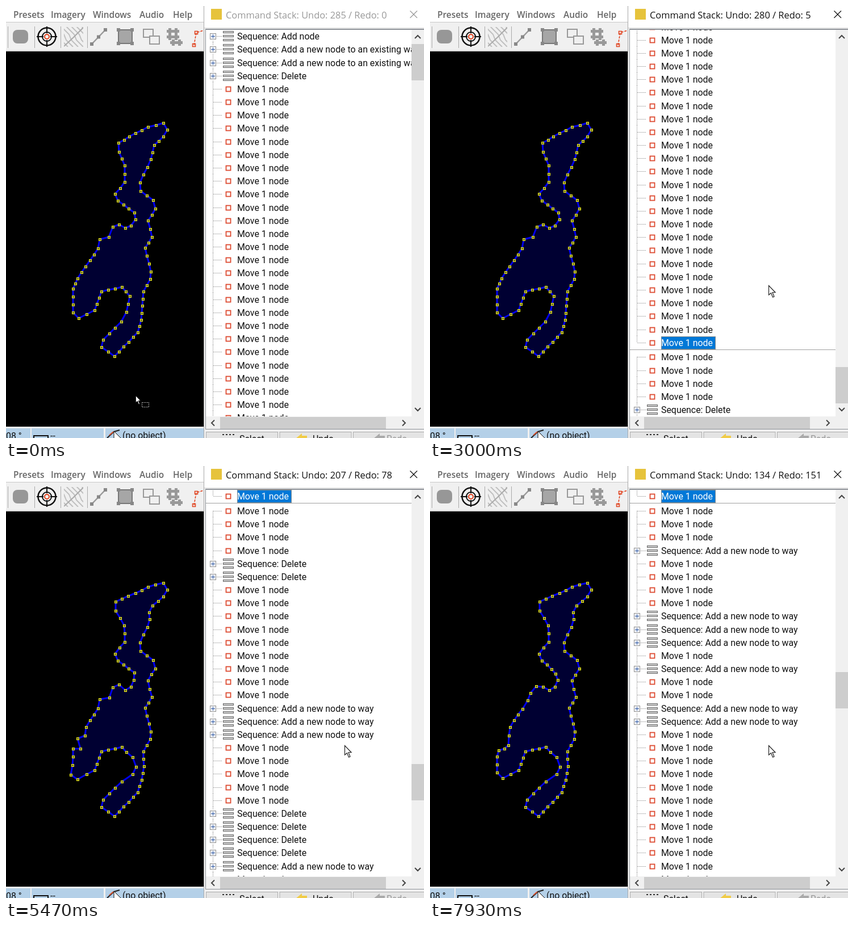
An HTML page with a canvas that plays this animation: 736x761 px, repeating every 8 s.

```html
<!DOCTYPE html>
<html lang="en">
<head>
<meta charset="utf-8">
<title>Undo stack</title>
<style>
html, body { margin: 0; width: 100%; height: 100%; overflow: hidden; background: #000; }
canvas { display: block; }
</style>
</head>
<body>
<canvas id="stage" width="736" height="761"></canvas>
<script>
const c = document.getElementById('stage').getContext('2d');
const LOOP = 8000, STEP = 200 / 3, ROW = 23.17, COUNT = 285;
const FIRST_UNDO = 2390, REPEAT = 2860, RATE = 0.02964;
const LIST_FONT = '15.9px Roboto, sans-serif';
const TITLE_FONT = '16.4px "Open Sans", sans-serif';
const MENU_FONT = '600 15.4px "Open Sans", sans-serif';

// Corners of the lake; the nodes between them are spaced evenly.
const corners = [
  [250,213], [277,206], [284,218], [277,230], [261,245], [255,270], [236,311], [237,326],
  [259,342], [263,357], [250,378], [257,407], [245,426], [255,468], [254,481], [242,503],
  [238,553], [232,575], [191,617], [168,601], [171,588], [203,556], [212,539], [218,511],
  [204,495], [168,503], [156,536], [128,550], [118,540], [118,498], [126,480], [162,427],
  [165,411], [181,407], [188,389], [199,385], [210,391], [220,387], [228,376], [226,364],
  [197,343], [192,331], [209,310], [209,281], [199,257], [198,241], [217,230]
];

// Each edit drags the nodes around a point while the undo steps run from one number to another.
const edits = [
  { at: [258, 256], reach: 15, move: [-6, 1], steps: [0, 28] },
  { at: [217, 530], reach: 18, move: [15, 6], steps: [29, 61] },
  { at: [118, 545], reach: 14, move: [-4, 4], steps: [29, 61] },
  { at: [200, 250], reach: 24, move: [-6, -2], steps: [29, 61] },
  { at: [165, 411], reach: 12, move: [8, 4], steps: [62, 99] },
  { at: [205, 388], reach: 14, move: [0, 5], steps: [62, 99] },
  { at: [226, 366], reach: 14, move: [-5, 2], steps: [62, 99] },
  { at: [124, 480], reach: 16, move: [12, 12], steps: [62, 99] },
  { at: [118, 545], reach: 14, move: [4, -4], steps: [132, 150] },
  { at: [180, 404], reach: 14, move: [-6, -8], steps: [132, 150] }
];

const wayRows = new Set([137, 142, 143, 144, 146, 149, 150, 180, 188, 222, 223, 224, 234, 242, 243, 244, 245]);
const deleteRows = new Set([3, 211, 212, 230, 231, 232, 233, 240, 241, 284]);

const clamp = (v, a = 0, b = 1) => Math.min(b, Math.max(a, v));
const mix = (a, b, p) => a + (b - a) * p;
const ease = p => p * p * (3 - 2 * p);
const noise = i => { const v = Math.sin(i * 12.9898 + 1) * 43758.5453; return v - Math.floor(v); };

function box(x, y, w, h, fill) {
  c.fillStyle = fill;
  c.fillRect(x, y, w, h);
}

function frame(x, y, w, h, color, width = 1) {
  c.strokeStyle = color;
  c.lineWidth = width;
  c.strokeRect(x, y, w, h);
}

function path(pts, stroke, width = 1, fill, closed) {
  c.beginPath();
  pts.forEach(p => c.lineTo(...p));
  if (closed) c.closePath();
  if (fill) { c.fillStyle = fill; c.fill(); }
  if (stroke) { c.strokeStyle = stroke; c.lineWidth = width; c.stroke(); }
}

function dashed(dash, drawIt) {
  c.setLineDash(dash);
  drawIt();
  c.setLineDash([]);
}

function ring(x, y, r, color, width) {
  c.beginPath();
  c.arc(x, y, r, 0, 7);
  c.strokeStyle = color;
  c.lineWidth = width;
  c.stroke();
}

function text(s, x, y, font, color) {
  c.font = font;
  c.fillStyle = color;
  c.fillText(s, x, y);
}

const label = (s, x, y, color = '#111') => text(s, x, y, LIST_FONT, color);

const nodes = corners.flatMap(([x, y], i) => {
  const [u, v] = corners[(i + 1) % corners.length];
  const n = Math.max(1, Math.round(Math.hypot(u - x, v - y) / 13));
  return Array.from({ length: n }, (_, k) => [mix(x, u, k / n), mix(y, v, k / n)]);
});

// A node jumps at its own random moment within an edit.
function place([x, y], i, done) {
  let dx = 0, dy = 0;
  for (const { at, reach, move, steps } of edits) {
    if (done < mix(steps[0] + 1, steps[1], noise(i))) continue;
    const pull = Math.exp(-((x - at[0]) ** 2 + (y - at[1]) ** 2) / reach ** 2);
    dx += move[0] * pull;
    dy += move[1] * pull;
  }
  return [Math.round(x + dx), Math.round(y + dy)];
}

function drawMap(done) {
  box(0, 80, 348, 661, '#000');
  const pts = nodes.map((p, i) => place(p, i, done));
  c.lineJoin = 'round';
  path(pts, '#0000ee', 3, '#000032', true);
  c.lineJoin = 'miter';
  for (const [x, y] of pts) {
    box(x - 2, y - 2, 5, 5, '#f0f010');
    box(x - 1, y - 1, 3, 3, '#6c6c30');
  }
}

function drawToolbar() {
  box(0, 0, 348, 29, '#fff');
  box(0, 29, 348, 51, '#f0f0f0');
  box(0, 28, 348, 1, '#c8c8c8');
  box(0, 78, 348, 2, '#d8d8d8');
  Object.entries({ Presets: 13, Imagery: 79, Windows: 153, Audio: 235, Help: 294 })
    .forEach(([s, x]) => text(s, x, 21, MENU_FONT, '#666'));
  for (let x = 3; x < 150; x += 46.5) box(Math.round(x), 36, 1, 38, '#aaa');

  c.beginPath();
  c.roundRect(12, 42, 27, 24, 8);
  c.fillStyle = '#979797';
  c.fill();

  ring(72, 54, 15.5, '#111', 2.5);
  ring(72, 54, 8, '#111', 2);
  ring(72, 54, 4, '#e0401c', 2);
  for (const s of [-1, 1]) {
    path([[72 + s * 6, 54], [72 + s * 18, 54]], '#111', 2);
    path([[72, 54 + s * 6], [72, 54 + s * 18]], '#111', 2);
  }

  c.save();
  c.beginPath();
  c.rect(102, 37, 34, 35);
  c.clip();
  for (let x = 70; x < 140; x += 9) path([[x, 36], [x + 14, 50], [x + 18, 60], [x + 30, 72]], '#c0c0c0', 2);
  path([[102, 71], [118, 56], [136, 38]], '#aaa', 2);
  c.restore();

  path([[151, 67], [175, 42]], '#999', 2.5);
  for (let k = 0; k < 3; k++) box(148 + 12 * k, 64 - 12.5 * k, 6, 6, '#888');

  box(198, 42, 24, 24, '#a6a6a6');
  frame(198, 42, 24, 24, '#777', 2);
  for (const x of [198, 222]) for (const y of [42, 66]) box(x - 3, y - 3, 6, 6, '#888');

  for (const k of [0, 1]) {
    box(242 + 11 * k, 41 + 12 * k, 17, 14, '#f0f0f0');
    frame(242 + 11 * k, 41 + 12 * k, 17, 14, '#999', 2);
  }

  for (let k = 0; k < 6; k++) {
    const x = 288 + k % 2 * 11 + (k > 3 ? 6 : 0), y = 44 + Math.floor(k / 2) * 10;
    box(x - 5, y - 2, 11, 5, '#999');
    box(x - 2, y - 5, 5, 11, '#999');
  }

  dashed([4, 2], () => path([[331, 69], [335, 47], [348, 43]], '#e0401c', 1.5));
  frame(328.5, 66.5, 5, 5, '#e0401c', 1.5);
  frame(332.5, 44.5, 5, 5, '#e0401c', 1.5);
}

function drawStatus() {
  box(0, 741, 348, 20, '#f0f0f0');
  [[0, 43], [45, 172], [175, 348]].forEach(([a, b]) => box(a, 744, b - a, 17, '#b4d0e8'));
  label('08 °', 0, 763);
  path([[49, 761], [49, 757], [74, 757], [74, 761]], '#111', 2);
  label('--', 78, 763);
  path([[178, 761], [190, 750], [200, 747]], '#222', 2);
  path([[182, 756], [189, 750]], '#d8502c', 2);
  path([[190, 749], [190, 766], [202, 761]], '#111', 1, '#fff', true);
  label('(no object)', 205, 762);
}

function rowText(i) {
  if (deleteRows.has(i)) return 'Sequence: Delete';
  if (i === 0) return 'Sequence: Add node';
  if (i < 3) return 'Sequence: Add a new node to an existing way';
  const early = i > 30 && i < 130 && i % 9 === 0;
  return early || wayRows.has(i) ? 'Sequence: Add a new node to way' : 'Move 1 node';
}

function drawRow(i, y, selected, first) {
  const s = rowText(i);
  dashed([1, 1], () => {
    path([[364.5, first ? y : y - 12], [364.5, selected ? y : y + 12]], '#888');
    path([[365, y + 0.5], [380, y + 0.5]], '#888');
  });
  if (s[0] === 'S') {
    box(358, y - 6, 13, 13, '#fff');
    frame(359.5, y - 4.5, 10, 10, '#8c8c8c');
    box(361, y, 7, 1, '#2450a0');
    box(364, y - 3, 1, 7, '#2450a0');
    for (let k = -1; k < 2; k++) {
      box(382, y + k * 7 - 2, 19, 4, '#686868');
      box(383, y + k * 7 - 1, 17, 2, '#d0d0d0');
    }
  } else {
    frame(387.5, y - 3.5, 8, 8, '#dd4a30', 1.8);
  }
  if (selected) {
    c.font = LIST_FONT;
    const w = Math.round(c.measureText(s).width) + 5;
    box(407, y - 11, w, 23, '#0078d7');
    dashed([1, 1], () => frame(407.5, y - 10.5, w - 1, 22, '#ff9a40'));
  }
  label(s, 407, y + 6, selected ? '#fff' : '#111');
}

function drawList(top, offset) {
  c.save();
  c.beginPath();
  c.rect(352, 42, 362, 681);
  c.clip();
  const from = Math.max(0, Math.floor(offset / ROW) - 1);
  for (let i = from; i < Math.min(COUNT, from + 33); i++) {
    const below = top >= 0 && i > top;
    const y = Math.round(53.3 + i * ROW - offset + (below ? 2.6 : 0));
    drawRow(i, y, i === top, i === 0 || below && i === top + 1);
    if (i === top) box(352, y + 12, 362, 1, '#a0a0a0');
  }
  c.restore();
}

function chevron(x, y, turn) {
  c.save();
  c.translate(x, y);
  c.rotate(turn * Math.PI / 2);
  path([[-5, 2.5], [0, -2.5], [5, 2.5]], '#444', 2);
  c.restore();
}

function drawArrow(x, color) {
  path([[x, 762], [x + 11, 753], [x + 11, 757], [x + 20, 757], [x + 20, 762]], null, 1, color, true);
}

function drawDialog(undo, top, offset, active, dragging) {
  box(348, 0, 388, 761, '#f0f0f0');
  box(348, 0, 1, 761, '#a8a8a8');
  box(349, 0, 387, 38, '#fff');
  box(349, 38, 387, 1, '#dcdcdc');
  box(351, 40, 385, 706, '#8e9298');
  box(352, 42, 362, 681, '#fff');
  box(352, 723, 384, 22, '#f0f0f0');
  box(714, 42, 22, 703, '#f0f0f0');

  box(361, 5, 19, 19, '#e6c33c');
  const ink = active ? '#111' : '#999';
  text(`Command Stack: Undo: ${undo} / Redo: ${COUNT - undo}`, 387, 21.5, TITLE_FONT, ink);
  path([[711.5, 8.5], [724, 21]], ink, 1.2);
  path([[724, 8.5], [711.5, 21]], ink, 1.2);

  drawList(top, offset);

  box(714, Math.round(67 + offset * 0.096), 22, 64, dragging ? '#606060' : '#cdcdcd');
  box(377, 724, 292, 21, '#cdcdcd');
  chevron(725, 54.5, 0);
  chevron(725, 710.5, 2);
  chevron(364.5, 734.5, 3);
  chevron(700.5, 734.5, 1);

  for (let x = 352; x < 736; x += 129.5) {
    box(x, 750, 126, 11, '#e4e4e4');
    frame(x + 0.5, 750.5, 126, 20, '#adadad');
  }
  dashed([3, 3], () => path([[381, 755], [405, 755]], '#333', 2));
  drawArrow(510, '#f0cc48');
  drawArrow(647, '#aaa');
  label('Select', 411, 768);
  label('Undo', 540, 768);
  label('Redo', 670, 768, '#999');
}

function cursorAt(t) {
  const glide = (a, b, start, time) => {
    const p = ease(clamp((t - start) / time));
    return [mix(a[0], b[0], p), mix(a[1], b[1], p)];
  };
  const rest = [520, 577];
  if (t < 470) return glide([228, 686], rest, 0, 330);
  if (t < 1300) return glide(rest, [712, 92], 470, 800);
  if (t > 2190) return glide([712, 492], [596, 492], 2190, 200);
}

function drawCursor(t) {
  const spot = cursorAt(t);
  if (!spot) return;
  const onMap = spot[0] < 348;
  c.save();
  c.translate(...spot);
  if (onMap) {
    dashed([1.5, 1.5], () => frame(11.5, 12.5, 12, 8, '#ddd'));
    c.scale(0.75, 0.75);
  }
  path([[0.5, 0.5], [0.5, 17], [4.5, 13.5], [7.5, 21], [10, 20], [7, 12.5], [12, 12.5]],
    onMap ? '#000' : '#222', 1.2, '#fff', true);
  c.restore();
}

function draw(now) {
  const t = Math.floor((now % LOOP + 10) / STEP) * STEP % LOOP;
  // One step on the key press, then steady repeats.
  const done = t < FIRST_UNDO ? 0 : 1 + Math.max(0, t - REPEAT) * RATE;
  const undo = Math.round(COUNT - done);
  const top = done ? undo - 1 : -1;
  const bottom = COUNT * ROW + 2.6 - 681;
  const offset = done ? Math.min(top * ROW, bottom) : 4111 * ease(clamp((t - 1270) / 660));
  drawMap(done);
  drawToolbar();
  drawStatus();
  drawDialog(undo, top, offset, t > 500, t > 1320 && t < 2150);
  drawCursor(t);
  requestAnimationFrame(draw);
}
requestAnimationFrame(draw);
</script>
</body>
</html>
```
